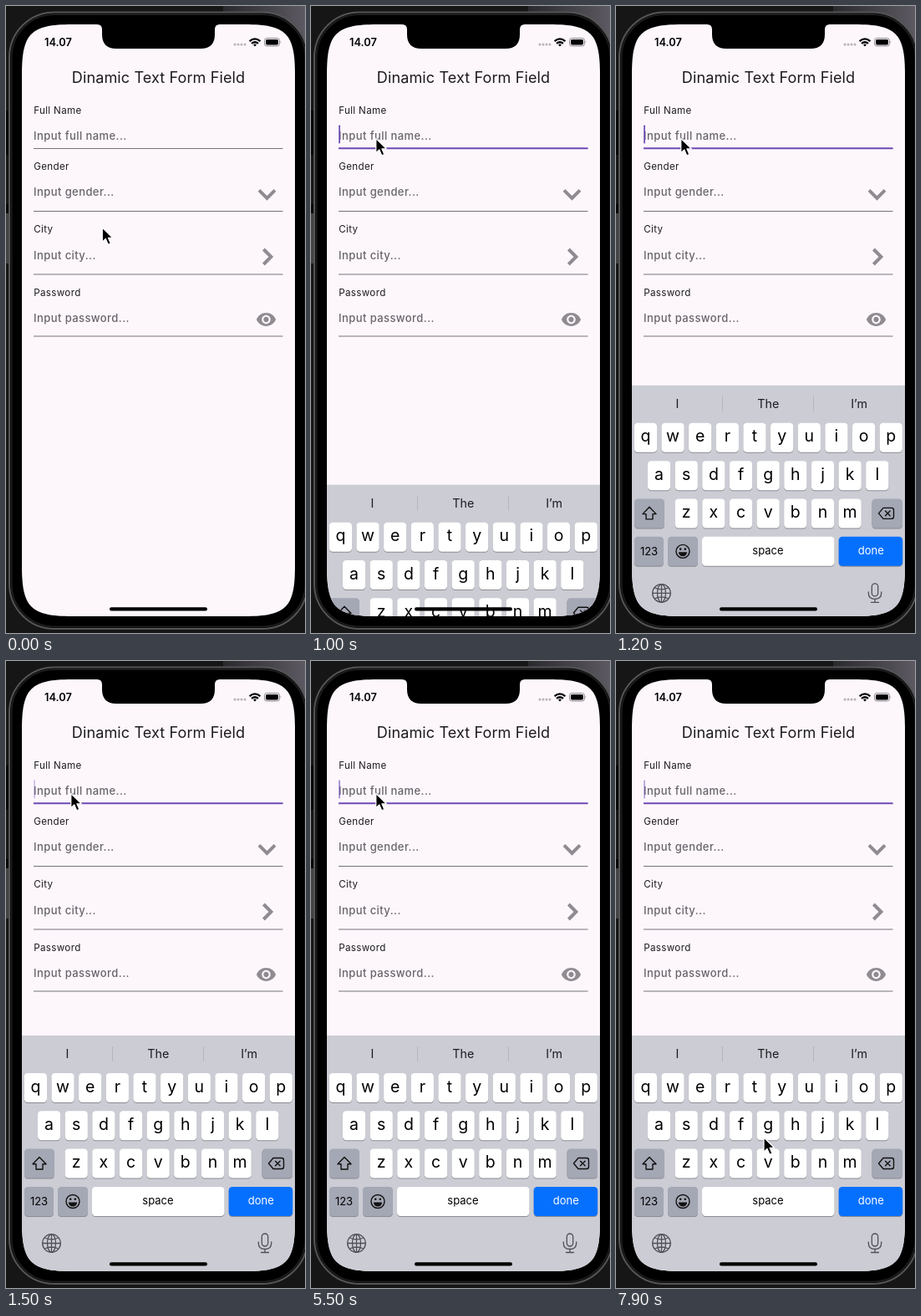
Recreate the animation shown at these times as an HTML page. Size 358x750 px, loop 8000 ms.

```html
<!DOCTYPE html>
<html lang="en">
<head>
<meta charset="utf-8">
<title>Text form field demo</title>
<style>
  html, body { margin: 0; width: 100%; height: 100%; overflow: hidden; background: #111; }
  svg { display: block; width: 100%; height: 100%; }
  text { font-family: Inter, Roboto, sans-serif; fill: #1d1b20; }
  .mid { text-anchor: middle; }
  .title { font-size: 18.1px; letter-spacing: .08px; }
  .label { font-size: 11.6px; letter-spacing: .35px; }
  .hint { font-size: 13px; font-weight: 500; letter-spacing: .42px; fill: #68646b; }
  .rule { stroke: #77727b; }
  .icon { fill: none; stroke: #8f8b91; stroke-width: 4; }
  .letter { font-size: 19.5px; fill: #000; }
  .small { font-size: 13px; fill: #000; }
  .word { font-size: 14.3px; }
  .line { fill: none; stroke: #111; stroke-width: 1.4; stroke-linejoin: round; stroke-linecap: round; }
  .tool { fill: none; stroke: #505157; stroke-width: 1.3; stroke-linecap: round; }
</style>
</head>
<body>
<svg viewBox="0 0 358 750">
  <defs>
    <clipPath id="screen">
      <path d="M19 82C19 32.6 29.6 22 79 22H286C335.4 22 346 32.6 346 82V670C346 719.4 335.4 730 286 730H79C29.6 730 19 719.4 19 670Z"/>
    </clipPath>
    <linearGradient id="glow">
      <stop offset="0" stop-color="#2a292c"/>
      <stop offset="1" stop-color="#5c5962"/>
    </linearGradient>
  </defs>

  <rect width="358" height="750" fill="#161616"/>
  <rect x="260" width="98" height="40" fill="url(#glow)"/>
  <path d="M0 125h3v53h-3zM0 237h3v11h-3z" fill="#050505"/>
  <path d="M0 248h3v60h-3z" fill="#444446"/>
  <rect x="4" y="7.5" width="357" height="737.5" rx="54" fill="#000" stroke="#555557" stroke-width="2"/>
  <rect x="6.5" y="10" width="352" height="732.5" rx="51.5" fill="none" stroke="#1d1d1e" stroke-width="2"/>

  <g clip-path="url(#screen)">
    <rect x="19" y="22" width="327" height="708" fill="#fdf7fc"/>
    <text class="title mid" x="182.5" y="92">Dinamic Text Form Field</text>
    <g id="form"></g>
    <path class="icon" d="M303 220.4l9.5 9.5 9.5-9.5M308.4 291l9 9-9 9"/>
    <path transform="translate(298.9 362.4) scale(1.05)" fill="#8f8b91" d="M12 4.5C7 4.5 2.73 7.61 1 12c1.73 4.39 6 7.5 11 7.5s9.27-3.11 11-7.5c-1.73-4.39-6-7.5-11-7.5zM12 17c-2.76 0-5-2.24-5-5s2.24-5 5-5 5 2.24 5 5-2.24 5-5 5zm0-8c-1.66 0-3 1.34-3 3s1.34 3 3 3 3-1.34 3-3-1.34-3-3-3z"/>
    <path id="focus" d="M33 170.3H331.5" stroke="#7048b4"/>
    <rect id="caret" x="33.2" y="142.5" width="1.7" height="22" rx=".8" fill="#6848b4"/>

    <g id="keyboard">
      <rect x="19" y="448" width="327" height="300" fill="#cbccd4"/>
      <path d="M127.5 461v18M236.5 461v18" stroke="#b4b5bd"/>
      <g id="keys"></g>
      <path class="line" d="M40 593.5l8 8.3h-4v6.2h-8v-6.2h-4z"/>
      <path class="line" d="M320 594.5h10q2.5 0 2.5 2.5v8q0 2.5-2.5 2.5h-10l-5.5-6.5zM322.5 598.2l5.6 5.6M328.1 598.2l-5.6 5.6"/>
      <circle class="line" cx="80" cy="646.5" r="8"/>
      <path d="M74.8 647.5h10.4q-.8 5-5.2 5t-5.2-5z" fill="#111"/>
      <circle cx="77.2" cy="643.8" r="1.3" fill="#111"/>
      <circle cx="82.8" cy="643.8" r="1.3" fill="#111"/>
      <g class="tool">
        <circle cx="54.5" cy="696.5" r="10.8"/>
        <ellipse cx="54.5" cy="696.5" rx="5" ry="10.8"/>
        <path d="M54.5 685.7v21.6M43.7 696.5h21.6M46.5 690q8 4 16 0M46.5 703q8-4 16 0"/>
        <rect x="306.3" y="685" width="7.4" height="15" rx="3.7"/>
        <path d="M302.3 695v1.5q0 7 7.7 7t7.7-7v-1.5M310 703.5v4M305.5 707.5h9"/>
      </g>
    </g>
    <rect x="124" y="719.3" width="117" height="4.2" rx="2.1" fill="#000"/>
  </g>

  <path d="M109 20v2q6 0 6 6v6q0 17 17 17h101q17 0 17-17v-6q0-6 6-6v-2z" fill="#000"/>
  <text x="46" y="48" font-size="12.8" font-weight="600" style="fill:#000">14.07</text>
  <path d="M274 46h14" stroke="#b7b2b8" stroke-width="3" stroke-linecap="round" stroke-dasharray="0 4"/>
  <g fill="none" stroke="#000" stroke-width="2.3">
    <path d="M291.6 42.2q6.4-5.6 12.8 0M294 44.8q4-3.2 8 0"/>
    <path d="M296 46.2q2-1.6 4 0l-2 2.2z" fill="#000" stroke="none"/>
  </g>
  <rect x="309.5" y="38.5" width="18" height="9.4" rx="2.8" fill="none" stroke="#8d888e"/>
  <rect x="311" y="40" width="15" height="6.4" rx="1.6"/>
  <path d="M328.6 41.6q1.6 1.5 0 3.2z" fill="#8d888e"/>

  <path id="mouse" d="M0 0v17.2l4-3.8 3 7 3-1.3-2.9-6.8h5.4z" fill="#000" stroke="#fff" stroke-width="1.2" stroke-linejoin="round"/>
</svg>
<script>
const $ = id => document.getElementById(id);
const LOOP = 8000;

const text = (cls, x, y, s, fill) =>
  `<text class="${cls}" x="${x}" y="${y}"${fill ? ` style="fill:${fill}"` : ''}>${s}</text>`;

// label, hint, label baseline, hint baseline, underline
$('form').innerHTML = [
  ['Full Name', 'full name', 128.5, 160, 170.5],
  ['Gender', 'gender', 195.5, 227, 245.5],
  ['City', 'city', 271, 302.5, 321],
  ['Password', 'password', 346.5, 378, 395]
].map(([label, hint, y1, y2, y3]) =>
  text('label', 33.2, y1, label) + text('hint', 33, y2, `Input ${hint}...`) +
  `<path class="rule" d="M33 ${y3}H331.5"/>`).join('');

function key(x, y, w, fill = '#fff') {
  const box = (dy, color) =>
    `<rect x="${x}" y="${y + dy}" width="${w}" height="35" rx="4.2" fill="${color}"/>`;
  return box(1, '#8b8c92') + box(0, fill);
}

const GREY = '#a4a7b4';
let keys = ['I', 'The', 'I’m'].map((s, i) => text('word mid', 73.5 + i * 108.8, 475, s)).join('');
[['qwertyuiop', 35.4], ['asdfghjkl', 51.6], ['zxcvbnm', 84.2]].forEach(([row, x0], r) => {
  [...row].forEach((c, i) => {
    const x = x0 + i * 32.65, y = 493 + r * 45.3;
    keys += key(x - 13.6, y, 27.2) + text('letter mid', x, y + 22.6, c);
  });
});
keys += key(22, 583.6, 36, GREY) + key(306.5, 583.6, 36.5, GREY) +
  key(22, 629, 35, GREY) + key(62, 629, 36, GREY) +
  key(103, 629, 158.5) + key(266.7, 629, 76.5, '#0670fe') +
  text('small mid', 39.5, 651, '123') + text('small mid', 182, 650.3, 'space') +
  text('small mid', 305.3, 650.3, 'done', '#fff');
$('keys').innerHTML = keys;

const clamp = v => Math.min(1, Math.max(0, v));
const mix = (a, b, p) => a + (b - a) * p;
const ease = p => p * p * (3 - 2 * p);

// time, x, y of the pointer tip
const path = [
  [50, 115.3, 265], [600, 77.8, 158.5], [6850, 77.8, 158.5], [7000, 78.5, 160],
  [7220, 78.5, 160], [7600, 126, 463], [7700, 126, 463], [7900, 177, 570]
];

function pointer(t) {
  let i = 0;
  while (i < path.length - 2 && t > path[i + 1][0]) i++;
  const [t0, x0, y0] = path[i], [t1, x1, y1] = path[i + 1];
  const p = ease(clamp((t - t0) / (t1 - t0)));
  return [mix(x0, x1, p), mix(y0, y1, p)];
}

function caretAlpha(t) {
  if (t < 880) return 0;
  const p = Math.max(0, t - 894) / 1012 % 1;
  return p < .75 ? clamp((.65 - p) / .15) : clamp((p - .85) / .15);
}

// critically damped slide from below the screen
function keyboardShift(t) {
  const u = Math.max(0, t - 905) / 1000 * 19.6;
  return 284 * Math.exp(-u) * (1 + u);
}

function draw(now) {
  const t = now % LOOP;
  $('mouse').setAttribute('transform', `translate(${pointer(t)})`);
  $('caret').setAttribute('opacity', caretAlpha(t));
  const shift = keyboardShift(t);
  $('keyboard').setAttribute('transform', `translate(0 ${shift < .2 ? 0 : shift})`);
  const focus = clamp((t - 850) / 170);
  $('focus').setAttribute('stroke-opacity', clamp(focus * 2));
  $('focus').setAttribute('stroke-width', 1 + focus);
  requestAnimationFrame(draw);
}
requestAnimationFrame(draw);
</script>
</body>
</html>
```
